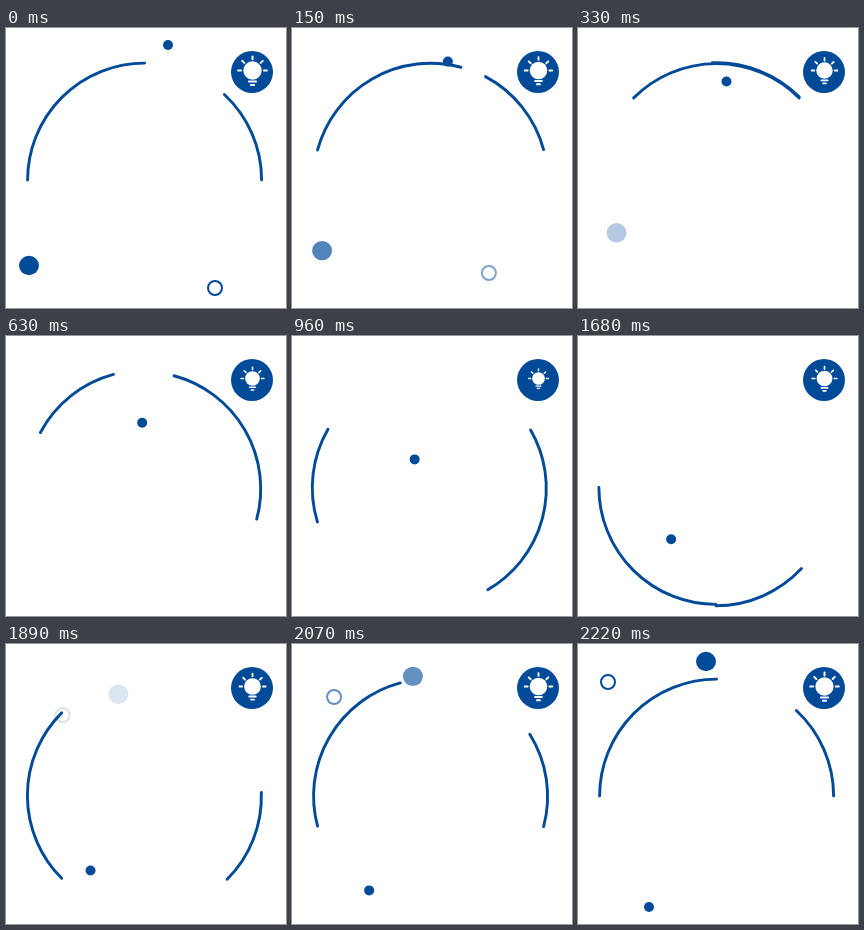
Recreate the animation shown at these times as an HTML page. Size 280 by 280 pixels, loop 2.25 s.

```html
<!DOCTYPE html>
<html lang="en">
<head>
<meta charset="utf-8">
<title>Idea loop</title>
<style>
  html, body { margin: 0; width: 100%; height: 100%; overflow: hidden; background: #fff; }
  svg { display: block; width: 100vw; height: 100vh; }
</style>
</head>
<body>
<svg viewBox="0 0 280 280">
  <g fill="none" stroke="#004a98" stroke-width="2.9" stroke-linecap="round">
    <path id="longArc"/>
    <path id="shortArc"/>
  </g>
  <circle id="dot" r="5" fill="#004a98"/>
  <ellipse id="blob" rx="10" ry="9.7" fill="#004a98"/>
  <circle id="ring" r="7" fill="none" stroke="#004a98" stroke-width="2"/>
  <circle cx="246" cy="44" r="21" fill="#004a98"/>
  <g id="bulb" fill="none" stroke="#fff" stroke-width="2" stroke-linecap="round">
    <circle r="9.2" fill="#fff" stroke="none"/>
    <path d="M0-14V-11.2M-10.3-9.6L-8.2-7.6M10.3-9.6L8.2-7.6M-14.4 0H-11.4M14.4 0H11.4M-3.6 11H3.6M-1.6 14.4H1.6"/>
  </g>
</svg>
<script>
  const LOOP = 2250, STEP = 30, LAST = 74;
  const PIVOT = { x: 137.9, y: 152.1 }, RADIUS = 117, WOBBLE = 0.7;
  const $ = id => document.getElementById(id);
  const lerp = (a, b, p) => a + (b - a) * p;
  const clamp = v => Math.max(0, Math.min(1, v));

  function arcPath(from, to) {
    const point = deg => {
      const a = deg * Math.PI / 180;
      return `${WOBBLE + RADIUS * Math.cos(a)} ${RADIUS * Math.sin(a)}`;
    };
    return `M${point(from)}A${RADIUS} ${RADIUS} 0 0 1 ${point(to)}`;
  }

  function turn(id, deg) {
    $(id).setAttribute("transform", `translate(${PIVOT.x} ${PIVOT.y}) rotate(${deg})`);
  }

  function slide(id, x0, y0, x1, y1, n) {
    const p = n / LAST;
    $(id).setAttribute("cx", lerp(x0, x1, p));
    $(id).setAttribute("cy", lerp(y0, y1, p));
  }

  // Visible at both ends of the loop, hidden in the middle
  function fade(id, n, out, back) {
    $(id).setAttribute("opacity", Math.max(clamp(1 - n / out), clamp(1 - (LAST - n) / back)));
  }

  function render(ms) {
    const n = Math.floor((ms % LOOP) / STEP);

    // The arcs turn against each other in 15 degree ticks
    const angle = Math.floor(n / 3) * 15;
    turn("longArc", angle);
    turn("shortArc", -angle);

    slide("dot", 162, 17, 71, 263, n);
    slide("blob", 23, 237.5, 128, 17.5, n);
    slide("ring", 209, 260, 30, 38, n);
    fade("blob", n, 15.5, 12.8);
    fade("ring", n, 10, 13);

    const scale = n < 33 ? lerp(1, 0.68, n / 33) : lerp(0.68, 1, (n - 33) / 42);
    $("bulb").setAttribute("transform", `translate(246.5 42.5) scale(${scale})`);
  }

  $("longArc").setAttribute("d", arcPath(180, 270));
  $("shortArc").setAttribute("d", arcPath(313, 360));

  const start = performance.now();
  function loop() {
    render(performance.now() - start);
    requestAnimationFrame(loop);
  }
  loop();
</script>
</body>
</html>
```
